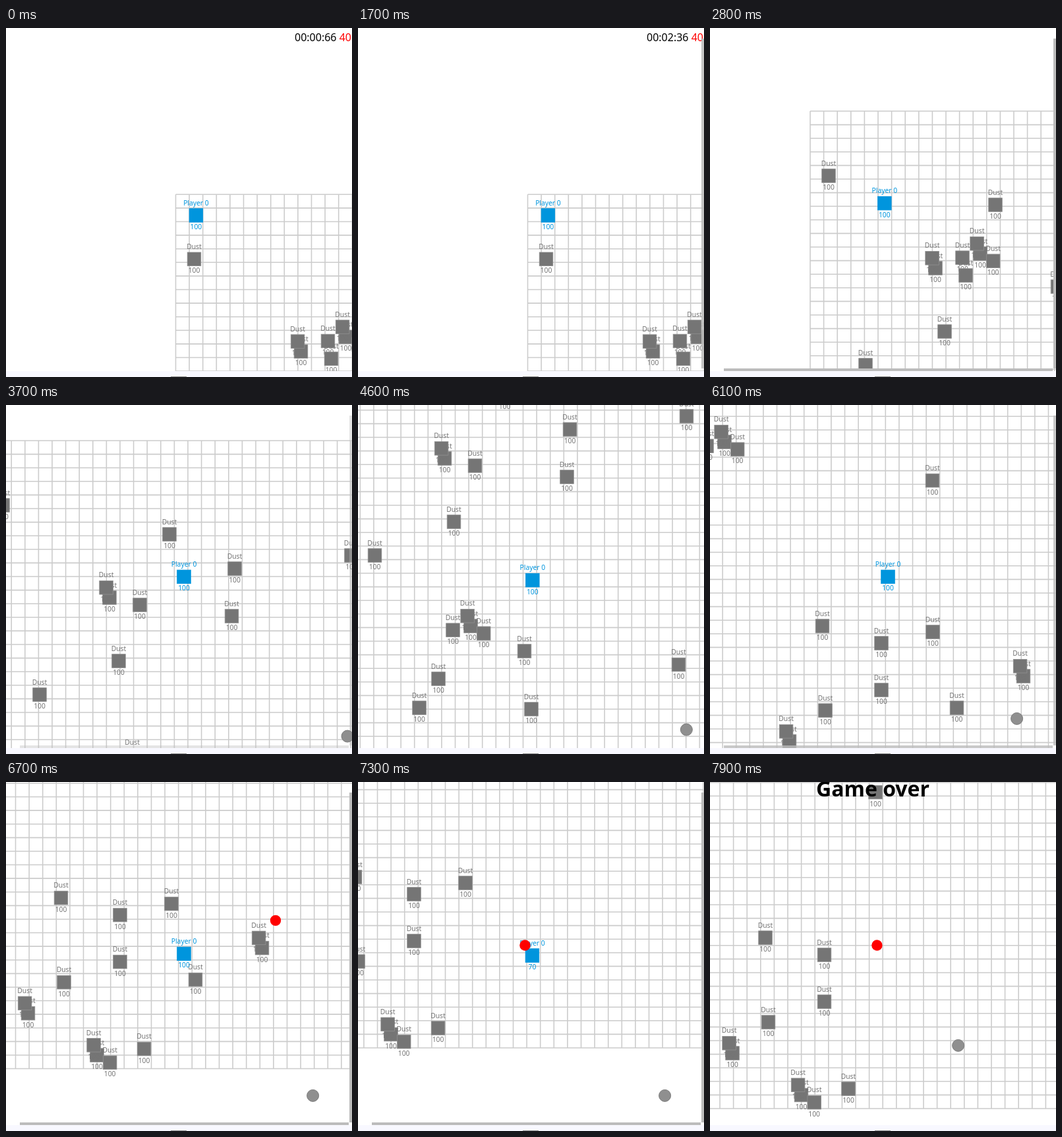
Write an HTML page that moves like this. It is 525x529 px and loops after 8000 ms.

```html
<!DOCTYPE html>
<html lang="en">
<head>
<meta charset="utf-8">
<title>Dust game</title>
<style>
  html, body { margin: 0; width: 100%; height: 100%; overflow: hidden; background: #fff; }
  svg { display: block; width: 525px; height: 529px; font-family: "Noto Sans", sans-serif; }
  .unit { font-size: 10.3px; text-anchor: middle; }
</style>
</head>
<body>
<svg id="stage" viewBox="0 0 525 529"></svg>
<script>
const LOOP = 8000, STEP = 100, CELL = 20.6, CELLS = 50;
const HIT = 17, DEATH = 7850;
const stage = document.getElementById("stage");

function add(parent, tag, attrs = {}, text = "") {
  const node = document.createElementNS("http://www.w3.org/2000/svg", tag);
  for (const key in attrs) node.setAttribute(key, attrs[key]);
  node.textContent = text;
  return parent.appendChild(node);
}
const place = (node, { x, y }) => node.setAttribute("transform", `translate(${x} ${y})`);
const show = (node, visible) => node.setAttribute("visibility", visible ? "visible" : "hidden");
const ramp = (t, from, to) => Math.min(1, Math.max(0, (t - from) / (to - from)));
const pad = n => String(n).padStart(2, "0");

// Turning points of the camera: time and where the grid's corner lies on screen.
const turns = [
  [1800, 257.5, 252.3], [2800, 152, 126], [3350, 33, 44], [3700, -33, 54],
  [4600, -58.5, -157], [5400, -50, -355], [6100, -207.5, -436],
  [6800, -309, -622], [7100, -407, -586], [7300, -382.5, -627], [7900, -294, -535]
];

function cameraAt(t) {
  let [, x, y] = turns[0];
  for (let i = 1; i < turns.length; i++) {
    const [from, x0, y0] = turns[i - 1], [to, x1, y1] = turns[i];
    const k = ramp(t, from, to);
    x += (x1 - x0) * k;
    y += (y1 - y0) * k;
  }
  return { x, y };
}

// The player starts off centre, then sways a little while it is being followed.
function playerAt(t) {
  const camera = cameraAt(t);
  const lead = 21 * (1 - ramp(t, 1800, 2800));
  const sway = t >= 2800 && t < 7000 ? 2.6 * Math.cos(Math.PI * (t - 2800) / 300) : 0;
  return {
    x: 267.4 + lead - sway - 3 * ramp(t, 7000, 7300) - camera.x,
    y: 263 + lead + sway - camera.y
  };
}

function enemyAt(t) {
  const player = playerAt(t), away = 1 - ramp(t, 6400, 7000);
  return { x: player.x - 11 + 300 * away, y: player.y - 15.5 - 70 * away };
}

const cursorAt = t => ({
  x: 524.6 - 59 * ramp(t, 3400, 6100) - 89 * ramp(t, 7300, 7900),
  y: 505.4 - 30 * ramp(t, 3400, 6100) - 76 * ramp(t, 7300, 7900)
});

// Dust lies alone or in small spirals: x, y and how many.
const clusters = [
  [28, 98], [190, 238, 2], [258, 216, 4], [236, 249], [281, 142], [204, 334],
  [84, 385], [380, 194], [375.5, 266], [557, 174], [229.5, 492, 4], [180.5, 572],
  [151.5, 616], [311, 530], [321.5, 618], [545, 550.5], [378, 771], [467.5, 797],
  [467.5, 868], [545.5, 780], [683, 847, 2], [382.5, 899], [582, 895],
  [328, 946, 2], [504, 1000], [432.5, 1009.5, 3]
];

function spiral([x, y, count = 1]) {
  return Array.from({ length: count }, (_, i) => ({
    x: x + 16 * Math.sqrt(i) * Math.cos(2 + 2.4 * i),
    y: y + 16 * Math.sqrt(i) * Math.sin(2 + 2.4 * i)
  }));
}

function hitTime(dust) {
  const touches = body => Math.hypot(body.x - dust.x, body.y - dust.y) < HIT;
  for (let t = 0; t < LOOP - STEP; t += 20) {
    if (touches(playerAt(t)) || (t >= 6400 && touches(enemyAt(t)))) return t;
  }
  return LOOP;
}

function makeUnit(parent, name, color, edge) {
  const unit = add(parent, "g", { class: "unit", fill: color });
  add(unit, "rect", {
    x: -CELL / 2, y: -CELL / 2, width: CELL, height: CELL, stroke: edge, "stroke-width": 0.8
  });
  add(unit, "text", { y: -15.3 }, name);
  unit.life = add(unit, "text", { y: 21 }, "100");
  return unit;
}

const world = add(stage, "g");
let lines = "";
for (let i = 0; i <= CELLS; i++) {
  const p = i * CELL, end = CELL * CELLS;
  lines += `M${p} 0V${end}M0 ${p}H${end}`;
}
add(world, "path", { d: lines, stroke: "#ccc", "stroke-width": 1.6, fill: "none" });

const dusts = clusters.flatMap(spiral).map(dust => {
  const node = makeUnit(world, "Dust", "#757575", "#909090");
  place(node, dust);
  return { node, eaten: hitTime(dust) };
});
const player = makeUnit(world, "Player 0", "#0095dd", "#0095dd");
const enemy = add(world, "circle", { r: 8.2, fill: "red" });

const timer = add(stage, "g", { "font-size": 16 });
const clock = add(timer, "text", { x: 438, y: 20 });
add(timer, "text", { x: 505.7, y: 20, fill: "red" }, "40");
const gameOver = add(stage, "text", {
  x: 247, y: 22, "font-size": 32, "font-weight": 700, "text-anchor": "middle"
}, "Game over");

const side = add(stage, "rect", { x: 521, y: 16, width: 4, height: 500, fill: "#bcbcbc" });
const lower = add(stage, "rect", { x: 21, y: 516, width: 499, height: 4, fill: "#bcbcbc" });
const cursor = add(stage, "circle", { r: 9, fill: "#8f8f8f", stroke: "#7c7c7c" });
add(stage, "rect", { y: 520, width: 525, height: 9, fill: "#f8f8ff" });
add(stage, "rect", { x: 250, y: 528, width: 24, height: 1, fill: "#909090" });

function render(t) {
  place(world, cameraAt(t));
  place(player, playerAt(t));
  show(player, t < DEATH);
  player.life.textContent = t < 7100 ? 100 : Math.max(10, 90 - (t - 7100) / 10);
  for (const { node, eaten } of dusts) show(node, t < eaten);

  place(enemy, enemyAt(t));
  show(enemy, t >= 6400);
  place(cursor, cursorAt(t));
  show(cursor, t >= 3400);

  const hundredths = 66 + t / 10;
  clock.textContent = `00:${pad(Math.floor(hundredths / 100))}:${pad(hundredths % 100)}`;
  show(timer, t < 1900);
  show(gameOver, t >= DEATH);

  const later = ramp(t, 5900, 6150) - ramp(t, 7300, 7700) - ramp(t, 3400, 3900);
  side.setAttribute("opacity", ramp(t, 1000, 1800) + later);
  lower.setAttribute("opacity", ramp(t, 1800, 2000) + later);
}

const start = performance.now();
function tick() {
  const elapsed = (performance.now() - start) % LOOP;
  render(Math.floor(elapsed / STEP) * STEP);
  requestAnimationFrame(tick);
}
tick();
</script>
</body>
</html>
```
